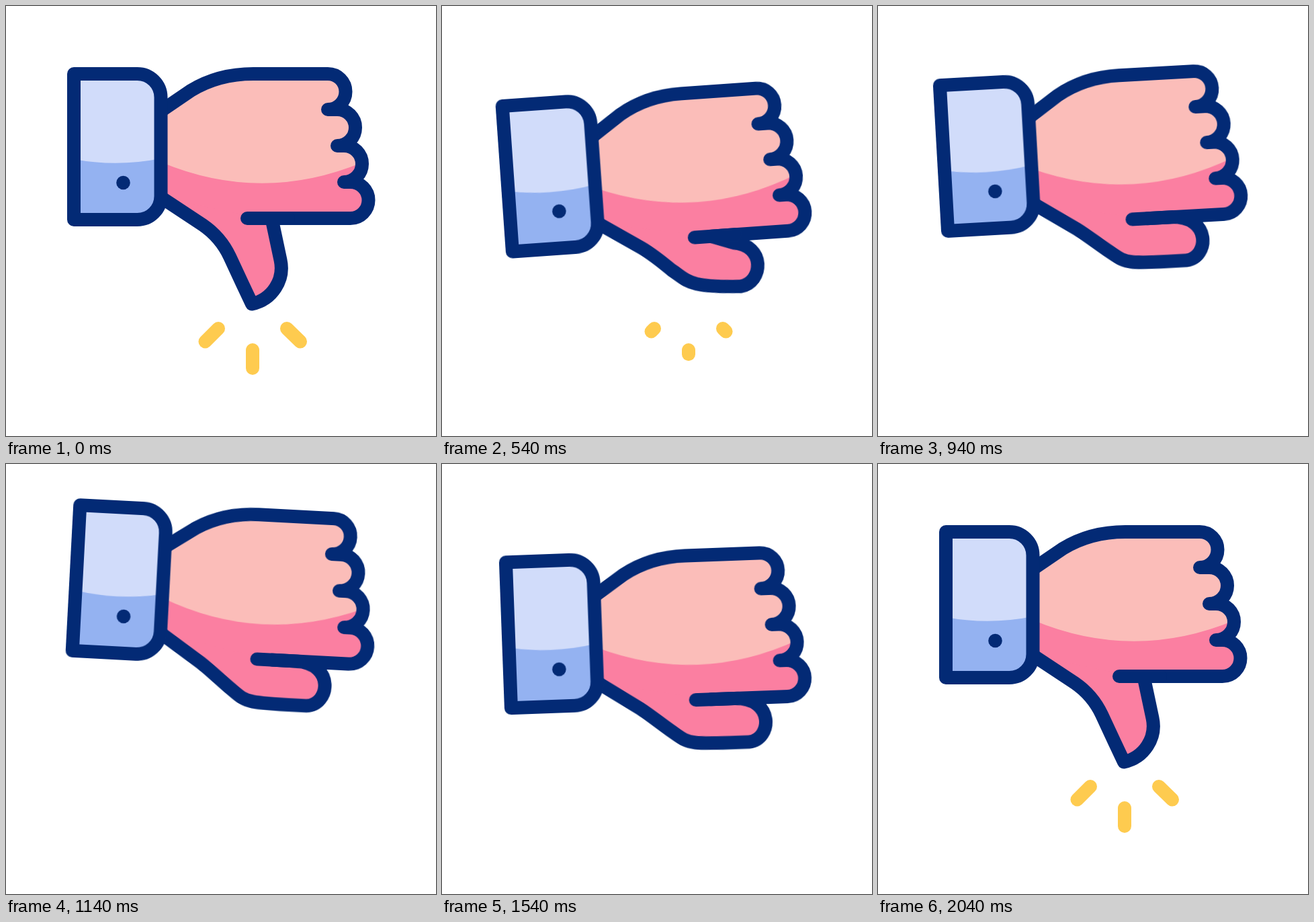
An HTML page without scripts for the animation above (2400 ms loop, 640x640 px).

```html
<!DOCTYPE html>
<html lang="en">
<head>
<meta charset="utf-8">
<title>Thumbs down</title>
<style>
  html, body { margin: 0; height: 100%; overflow: hidden; background: #fff; }
  svg { display: block; width: 100%; height: 100%; }

  .line { stroke: #032a75; stroke-width: 20; stroke-linecap: round; stroke-linejoin: round; }

  .bob, .tilt, .thumb, .crease, .rays path {
    animation: 2400ms cubic-bezier(.364, 0, .636, 1) infinite;
  }
  .bob { animation-name: bob; }
  .tilt { animation-name: tilt; transform-origin: 320px 270px; }
  .thumb { animation-name: curl; }
  .crease { animation-name: slide; }
  .rays { fill: none; stroke: #fecb4f; stroke-width: 20; stroke-linecap: round; animation: blink 2400ms step-end infinite; }
  .rays path { stroke-dasharray: 1 3; animation-name: shrink; }

  @keyframes bob {
    0%, 8.333% { transform: translateY(0); }
    28.333% { transform: translateY(40px); }
    50.167% { transform: translateY(-31px); }
    66.25% { transform: translateY(40px); }
    85%, 100% { transform: translateY(0); }
  }
  @keyframes tilt {
    0%, 8.333% { transform: rotate(0deg); }
    31.667% { transform: rotate(-6deg); }
    54.667% { transform: rotate(5.55deg); }
    70.417% { transform: rotate(-6deg); }
    85%, 100% { transform: rotate(0deg); }
  }
  @keyframes curl {
    0%, 8.333%, 85%, 100% {
      d: path("M231 285 L293 326 C312 339 324 354 333 373 C333 373 355 420.500 366 443.500 C396 437 415 408 408.500 378 L396 319");
    }
    28.333%, 66.25% {
      d: path("M231 285 L293 326 C306 335 324 350.500 336 359.500 C365 381 356 382 453 381.500 C488 379 493 317 435 316 L400 316");
    }
  }
  @keyframes slide {
    0%, 8.333%, 85%, 100% { transform: translateX(0); }
    28.333%, 66.25% { transform: translateX(17px); }
  }
  @keyframes shrink {
    0%, 8.333%, 85%, 100% { stroke-dashoffset: 0; }
    29.167%, 75% { stroke-dashoffset: 1; }
  }
  @keyframes blink {
    0% { visibility: visible; }
    29.1% { visibility: hidden; }
    75.2%, 100% { visibility: visible; }
  }
</style>
</head>
<body>
<svg viewBox="0 0 640 640">
  <g class="rays">
    <path pathLength="1" d="M316 480 L296.500 499.500"/>
    <path pathLength="1" d="M367 512 V539"/>
    <path pathLength="1" d="M418 480 L438 499.500"/>
  </g>

  <g class="bob">
    <g class="tilt">
      <!-- fist fill, thumb, fist outline -->
      <path fill="#fbbdb9" d="M231 156 L275 126 C306 107 336 101 368 101 H479 a26.500 26.500 0 0 1 0 53 H493 a27 27 0 0 1 0 54 H503 a27 27 0 0 1 0 54 H512.500 a27 27 0 0 1 0 54 H359 L231 260z"/>
      <path fill="#fb7fa1" d="M231 232.500 Q381 295 531 232.500 V316 H359 L293 322 L231 281z"/>
      <path class="thumb line" fill="#fb7fa1" d="M231 285 L293 326 C312 339 324 354 333 373 C333 373 355 420.500 366 443.500 C396 437 415 408 408.500 378 L396 319"/>
      <path class="line" fill="none" d="M231 156 L275 126 C306 107 336 101 368 101 H479 a26.500 26.500 0 0 1 0 53 H493 a27 27 0 0 1 0 54 H503 a27 27 0 0 1 0 54 H512.500 a27 27 0 0 1 0 54 H400"/>
      <path class="crease line" d="M420 316 H359"/>

      <!-- cuff -->
      <path fill="#d1dcfa" d="M101 101 H195.500 a35 35 0 0 1 35 35 V283 a35 35 0 0 1 -35 35 H101z"/>
      <path fill="#94b2f1" d="M101 228 Q165 240 230.500 227 V283 a35 35 0 0 1 -35 35 H101z"/>
      <path class="line" fill="none" d="M101 101 H195.500 a35 35 0 0 1 35 35 V283 a35 35 0 0 1 -35 35 H101z"/>
      <circle cx="174.500" cy="263" r="10.300" fill="#032a75"/>
    </g>
  </g>
</svg>
</body>
</html>
```
